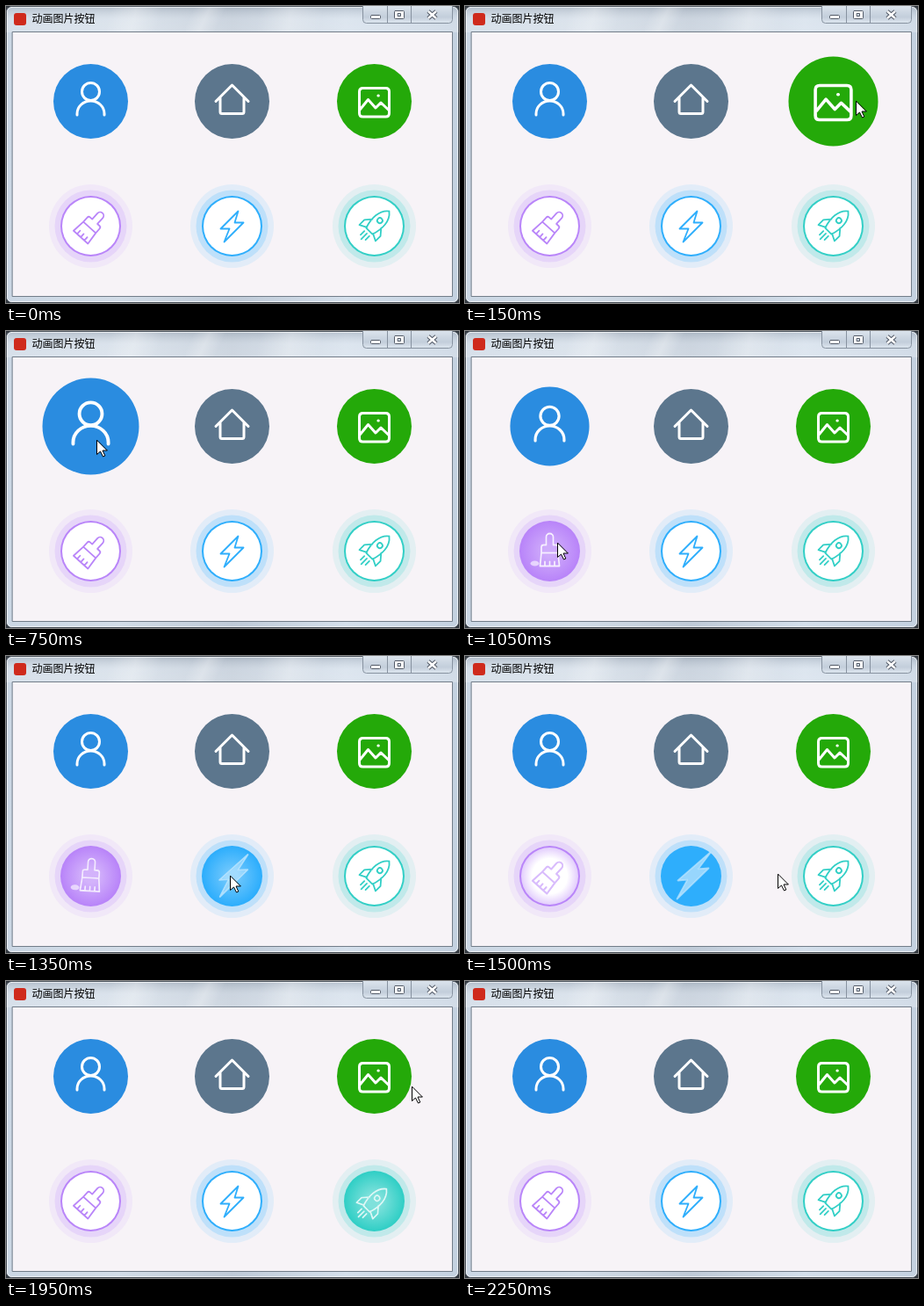
These frames come from a looping animation (516x338 px, 2.4 s). An HTML page with a canvas:

```html
<!DOCTYPE html>
<html lang="zh">
<head>
<meta charset="utf-8">
<style>
  html, body { margin: 0; width: 100%; height: 100%; overflow: hidden; }
  canvas { display: block; }
</style>
</head>
<body>
<canvas id="stage" width="516" height="338"></canvas>
<script>
const ctx = document.getElementById('stage').getContext('2d');
const STEP = 150, STEPS = 16;
const POP = [1.2, 1.294, 1.294, 1.06];
const GLOW = [0.75, 1, 0.7, 0.2];
const CURSOR = [null, [445, 108], [375, 112], [195, 115], [112, 114], [103, 124], [104, 185], [105, 241],
  [150, 246], [255, 250], [356, 248], [410, 246], [440, 210], [462, 120], null, null];

const clamp = v => Math.max(0, Math.min(1, v));
const mix = (a, b, k) => a + (b - a) * k;
const rgba = (rgb, a) => `rgba(${rgb},${a})`;

function disc(r, fill) {
  ctx.beginPath();
  ctx.arc(0, 0, r, 0, Math.PI * 2);
  ctx.fillStyle = fill;
  ctx.fill();
}

function box(x, y, w, h, r, fill, line) {
  ctx.beginPath();
  ctx.roundRect(x, y, w, h, r);
  if (fill) { ctx.fillStyle = fill; ctx.fill(); }
  if (line) { ctx.strokeStyle = line; ctx.lineWidth = 1; ctx.stroke(); }
}

function linear(x0, y0, x1, y1, ...colors) {
  const g = ctx.createLinearGradient(x0, y0, x1, y1);
  colors.forEach((c, i) => g.addColorStop(i / (colors.length - 1), c));
  return g;
}

function at(x, y, draw) {
  ctx.save();
  ctx.translate(x, y);
  draw();
  ctx.restore();
}

function drawWindow() {
  ctx.fillStyle = '#30363d';
  ctx.fillRect(0, 0, 516, 338);
  box(0.5, 0.5, 515, 337, 6, linear(0, 0, 516, 0, '#cbd7e4', '#d2dce7', '#bfcad7', '#d4dfeb', '#c4d1e0'), '#454d56');
  ctx.save();
  ctx.clip();
  ctx.fillStyle = linear(0, 0, 0, 30, 'rgba(120,132,146,.35)', 'rgba(255,255,255,.2)', 'rgba(255,255,255,.25)');
  ctx.fillRect(0, 0, 516, 30);
  for (const [x, w] of [[120, 55], [215, 30], [290, 70]]) {
    ctx.fillStyle = linear(x, 0, x + w, 14, 'rgba(255,255,255,0)', 'rgba(255,255,255,.28)', 'rgba(255,255,255,0)');
    ctx.fillRect(x - 10, 1, w + 20, 28);
  }
  ctx.restore();
  box(1.5, 1.5, 513, 335, 5, null, 'rgba(255,255,255,.7)');
  box(7.5, 29.5, 501, 301, 0, '#f7f3f7', '#727d89');

  box(9, 8, 14, 14, 3, '#cf2a1c');
  ctx.fillStyle = '#000';
  ctx.font = '12px "Noto Sans CJK SC", "Noto Sans CJK", sans-serif';
  ctx.fillText('动画图片按钮', 29.5, 19);

  box(406.5, -4, 102, 23.5, 4, linear(0, 0, 0, 19, '#dce4ed', '#ced8e3', '#c3cedb', '#dce5ee'), '#8792a0');
  ctx.fillStyle = '#8792a0';
  ctx.fillRect(434, 0, 1, 19);
  ctx.fillRect(461, 0, 1, 19);
  box(415.5, 10.5, 11, 4, 1, '#fff', '#535b68');
  box(442.5, 5.5, 11, 9, 1, '#fff', '#535b68');
  box(446.5, 8.5, 3, 3, 0, '#cbd5e0', '#535b68');
  ctx.lineCap = 'butt';
  for (const [color, width] of [['#535b68', 4.6], ['#fff', 2.4]]) {
    ctx.strokeStyle = color;
    ctx.lineWidth = width;
    ctx.stroke(new Path2D('M481 6L490 14M490 6L481 14'));
  }
}

const FLAT = [
  { x: 96.5, color: '#2a8ce0', start: 4, icon: 'M-10-11a10 10 0 1 0 20 0a10 10 0 1 0-20 0M-15.5 15.5V14a15.5 14.5 0 0 1 31 0V15.5' },
  { x: 257.5, color: '#5c768d', start: 99, icon: 'M-18.5 0L0-18.5L18.5 0M-13.5-4V12q0 2 2 2H11.5q2 0 2-2V-4' },
  { x: 419.5, color: '#24a909', start: 1, icon: 'M-13-15H13q4 0 4 4V13.5q0 4-4 4H-13q-4 0-4-4V-11q0-4 4-4M-16 9L-7-2L1.5 7.5L7.5 1.5L16 9.5M4.4-6.5h.4' }
];

function drawFlat({ x, color, start, icon }, step) {
  at(x, 108.5, () => {
    const s = POP[step - start] || 1;
    ctx.scale(s, s);
    disc(42.5, color);
    ctx.strokeStyle = '#fff';
    ctx.lineWidth = 3;
    ctx.stroke(new Path2D(icon));
  });
}

function brush(p, paint) {
  const upright = clamp((p - 0.2) / 0.55);
  ctx.rotate(mix(42, 0, upright) * Math.PI / 180);
  paint(new Path2D('M-4-7V-16a4 4 0 0 1 8 0V-7M-4-7H-7q-2.5 0-2.5 2.5V2H9.5V-4.5Q9.5-7 7-7H4'
    + 'M-9.5 2L-11 17H11L9.5 2M-5.5 17v-5M0 17v-5M5.5 17v-5'));
  if (upright > 0.5) {
    ctx.fillStyle = 'rgba(255,255,255,.6)';
    ctx.beginPath();
    ctx.ellipse(-17, 14, 5, 3, 0, 0, Math.PI * 2);
    ctx.fill();
  }
}

const BOLT = [[7, -17], [-13, 3], [-3, 3], [-9, 18], [13, -4], [3, -4]];
const LONG_BOLT = [[23, -28], [-15, 5], [-4, 4], [-16, 26], [20, -9], [8, -8]];

function bolt(p, paint) {
  const k = clamp((p - 0.2) / 0.8);
  const points = BOLT.map(([x, y], i) => [mix(x, LONG_BOLT[i][0], k), mix(y, LONG_BOLT[i][1], k)]);
  const path = new Path2D('M' + points.join('L') + 'Z');
  ctx.fillStyle = rgba('255,255,255', k * 0.5);
  ctx.fill(path);
  ctx.globalAlpha = 1 - k * 0.5;
  paint(path);
}

function rocket(p, paint) {
  const k = clamp((p - 0.2) / 0.8);
  ctx.translate(-5 * k, 5 * k);
  ctx.rotate(Math.PI / 4);
  paint(new Path2D('M0-24C9-17 9-4 5 8H-5C-9-4-9-17 0-24M-3-9a3 3 0 1 0 6 0a3 3 0 1 0-6 0'
    + 'M-7-4L-13 3V11L-5 7M7-4L13 3V11L5 7M0 12V21M-4 12V18M4 12V18'));
}

const HALO = [
  { x: 96.5, rgb: '185,133,249', start: 7, icon: brush },
  { x: 257.5, rgb: '46,174,252', start: 9, icon: bolt },
  { x: 419.5, rgb: '50,207,198', start: 11, icon: rocket }
];

function drawHalo({ x, rgb, start, icon }, step) {
  const p = GLOW[step - start] || 0;
  at(x, 250.5, () => {
    disc(47.5, rgba(rgb, 0.1));
    disc(41, rgba(rgb, 0.2));
    disc(34.5, rgba(rgb, 1));
    disc(32.5, '#fff');
    if (p) {
      const glow = ctx.createRadialGradient(0, 0, 0, 0, 0, 33.5);
      const core = rgba(rgb, clamp((p - 0.2) / 0.8));
      glow.addColorStop(0, core);
      glow.addColorStop(0.75 * (1 - p), core);
      glow.addColorStop(1, rgba(rgb, clamp(p * 2.2)));
      disc(33.5, glow);
    }
    icon(p, path => {
      ctx.lineWidth = 1.8;
      for (const color of [rgba(rgb, 1), rgba('255,255,255', Math.sqrt(p))]) {
        ctx.strokeStyle = color;
        ctx.stroke(path);
      }
    });
  });
}

function drawCursor([x, y]) {
  at(x + 0.5, y + 0.5, () => {
    const arrow = new Path2D('M0 0V16L4 12.5L7 18.5L9.3 17.5L6.5 11.5H11.5Z');
    ctx.fillStyle = '#fff';
    ctx.fill(arrow);
    ctx.strokeStyle = '#000';
    ctx.lineWidth = 1;
    ctx.stroke(arrow);
  });
}

function render() {
  const step = Math.floor(performance.now() / STEP) % STEPS;
  drawWindow();
  ctx.lineCap = ctx.lineJoin = 'round';
  FLAT.forEach(button => drawFlat(button, step));
  HALO.forEach(button => drawHalo(button, step));
  if (CURSOR[step]) drawCursor(CURSOR[step]);
  requestAnimationFrame(render);
}
render();
</script>
</body>
</html>
```
